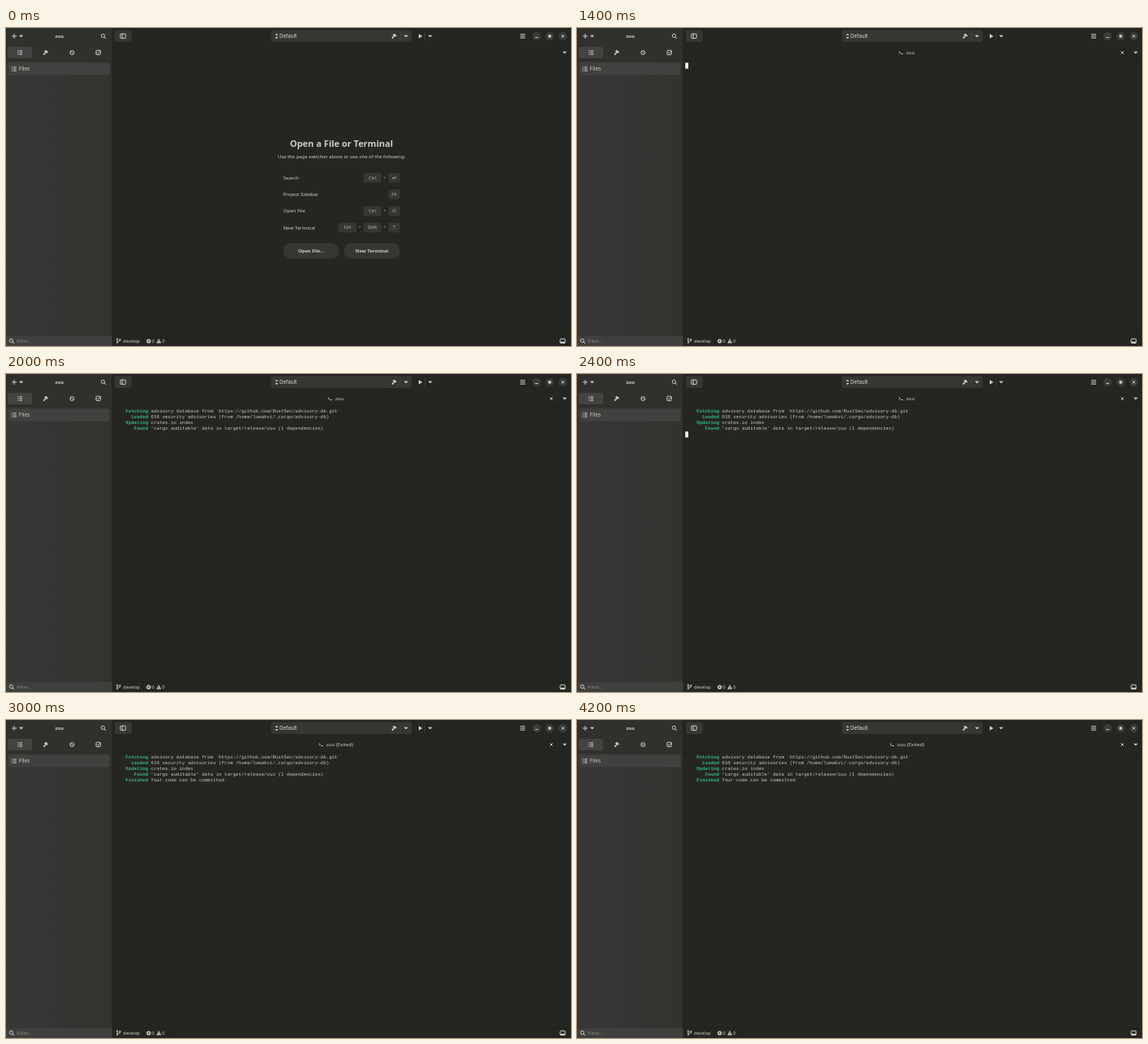
Recreate the animation shown at these times as an HTML page. Size 690 px wide and 388 px high, loop 5.1 s.

```html
<!DOCTYPE html>
<html lang="en">
<head>
<meta charset="utf-8">
<style>
html, body { margin: 0; width: 100%; height: 100%; overflow: hidden; background: #252621; }
svg { display: block; width: 690px; height: 388px; font: 6.05px "Noto Sans", "Open Sans", sans-serif; fill: #cdcdc9; }
.bold { font-weight: 700; }
.mid { text-anchor: middle; }
.line { fill: none; stroke: #cdcdc9; stroke-width: 1; }
.key rect { fill: #363732; }
.key text { font-size: 5.4px; fill: #b9b9b4; }
#term { font: 5.75px "Liberation Mono", monospace; fill: #c9c9c4; }
#term text { white-space: pre; }
#term .status { fill: #35b587; font-weight: 700; }
</style>
</head>
<body>
<svg viewBox="0 0 690 388">
  <defs>
    <linearGradient id="side"><stop offset="0" stop-color="#373836"/><stop offset="1" stop-color="#32332f"/></linearGradient>
    <path id="down" d="M-2.6-1.2h5.2L0 1.5z"/>
    <g id="list">
      <path class="line" d="M-.8-2.2h3.8M-.8 0h3.8M-.8 2.2h3.8"/>
      <path class="line" d="M-3-2.2h1.2M-3 0h1.2M-3 2.2h1.2"/>
    </g>
    <g id="lens" class="line"><circle cx="-.6" cy="-.6" r="2.1"/><path d="M1 1l2 2"/></g>
    <g id="hammer"><path d="M-2.4-1.2L.4-3.2 3.2-.4 2.2.6 1 .1-2 3.2-3.2 2.1-.2-1z"/></g>
    <path id="cross" class="line" d="M-1.6-1.6l3.2 3.2M1.6-1.6l-3.2 3.2"/>
  </defs>

  <!-- sidebar -->
  <rect width="129.5" height="388" fill="url(#side)"/>
  <rect width="129.5" height="40" fill="#30312d"/>
  <path d="M0 40h129.5" stroke="#292a26" stroke-width=".8"/>
  <path d="M129.7 0v388" stroke="#1f201c" stroke-width=".7"/>
  <rect x="2" y="23" width="30" height="14" rx="3" fill="#434441"/>
  <rect x="3" y="42.5" width="123.5" height="15" rx="3" fill="#41423f"/>
  <rect y="376" width="129.5" height="12" fill="#3f403d"/>
  <path class="line" d="M7 10h6M10 7v6"/>
  <use href="#down" x="18.5" y="10"/>
  <text class="bold mid" x="65.2" y="12" font-size="5.9">zuu</text>
  <use href="#lens" x="119" y="10"/>
  <use href="#list" x="17" y="30"/>
  <use href="#hammer" x="48.5" y="30"/>
  <g class="line"><circle cx="80.7" cy="30" r="2.5"/><path d="M79 28.3l3.4 3.4"/>
    <rect x="110" y="27.2" width="5.4" height="5.4" rx="1"/><path d="M111.2 29.8l1.3 1.3 3-3.4"/></g>
  <use href="#list" x="9.7" y="50"/>
  <text x="15.8" y="52.3" font-size="6.45">Files</text>
  <use href="#lens" x="7" y="382"/>
  <text x="13" y="384" font-size="5.9" fill="#8b8c88">Filter…</text>

  <!-- header bar -->
  <path d="M130 39.7h560M130 375.7h560" stroke="#1e1f1b" stroke-width=".8"/>
  <rect x="133" y="2.5" width="20.5" height="14.5" rx="3" fill="#363732"/>
  <g class="line"><rect x="139.7" y="7.2" width="6.4" height="5.4" rx=".8"/><path d="M142 7v6"/></g>
  <rect x="323.5" y="2.5" width="172" height="14.5" rx="3" fill="#363732"/>
  <path d="M328.6 9l1.9-2.3 1.9 2.3zM328.6 11l1.9 2.3 1.9-2.3z"/>
  <text x="334" y="12.2" font-size="6.2" fill="#dededa">Default</text>
  <use href="#hammer" x="474" y="10"/>
  <path d="M481.5 5v10M511.5 5v10" stroke="#4a4b46" stroke-width=".6"/>
  <use href="#down" x="488.5" y="10"/>
  <path d="M504 7.2l4.6 2.8-4.6 2.8z"/>
  <use href="#down" x="518" y="10"/>
  <path class="line" d="M628 7.8h6M628 10h6M628 12.2h6"/>
  <g fill="#3a3b37"><circle cx="648" cy="10" r="5.2"/><circle cx="664" cy="10" r="5.2"/><circle cx="680" cy="10" r="5.2"/></g>
  <path class="line" d="M646.2 11.6h3.6"/>
  <rect x="662.3" y="8.3" width="3.4" height="3.4" rx=".6"/>
  <use href="#cross" x="680" y="10"/>
  <use href="#down" x="682.3" y="30"/>

  <!-- status bar -->
  <g class="line" stroke-width=".8"><circle cx="135.8" cy="379.7" r=".8"/><circle cx="139.2" cy="380.3" r=".8"/><path d="M135.8 380.5v4.5M139.2 381c0 2-3.4 1-3.4 3"/></g>
  <text x="143" y="384" font-size="5.5">develop</text>
  <path d="M167.5 376v12M198 376v12" stroke="#1e1f1b" stroke-width=".8"/>
  <circle cx="174.2" cy="382" r="2.6"/>
  <path d="M173.2 381l2 2M175.2 381l-2 2" stroke="#252621" stroke-width=".8"/>
  <text x="178" y="384" font-size="5.6">0</text>
  <path d="M183.7 384.5l2.9-5.4 2.9 5.4z"/>
  <path d="M186.6 381v1.7M186.6 383.2v.7" stroke="#252621" stroke-width=".7"/>
  <text x="190.6" y="384" font-size="5.6">0</text>
  <rect class="line" x="676.8" y="379.3" width="6" height="5.2" rx=".8"/>
  <path d="M677 382.7h5.6v1.7H677z"/>

  <!-- empty page -->
  <g id="empty">
    <text class="bold mid" x="409.7" y="145" font-size="10.9">Open a File or Terminal</text>
    <text class="mid" x="409.8" y="159" font-size="5.85">Use the page switcher above or use one of the following:</text>
    <g id="keys"></g>
    <g fill="#363732"><rect x="338.5" y="262.5" width="68.5" height="19" rx="9.5"/><rect x="412.7" y="262.5" width="68.5" height="19" rx="9.5"/></g>
    <text class="bold mid" x="372.7" y="274" font-size="5.8">Open File…</text>
    <text class="bold mid" x="446.8" y="274" font-size="5.8">New Terminal</text>
  </g>

  <!-- terminal page -->
  <g id="page">
    <g id="tab">
      <path class="line" stroke-width=".8" d="M0 28.6l1.5 1.2L0 31M2.3 31.5h2.4"/>
      <text id="title" x="8.6" y="32"></text>
    </g>
    <use id="close" href="#cross" y="30"/>
    <g id="term"></g>
    <rect id="cursor" x="132.2" width="3.7" height="7.2" fill="#f2f2ee"/>
  </g>
</svg>
<script>
const $ = id => document.getElementById(id);
const show = (el, on) => el.style.display = on ? "" : "none";

const shortcuts = [["Search", "Ctrl", "↵"], ["Project Sidebar", "F9"], ["Open File", "Ctrl", "O"], ["New Terminal", "Ctrl", "Shift", "T"]];
$("keys").innerHTML = shortcuts.map(([label, ...keys], row) => {
  const y = 182.8 + row * 20.2;
  let right = 481, out = `<text x="338.5" y="${y + 2.2}">${label}</text>`;
  keys.reverse().forEach((key, i) => {
    const w = i ? 22 : 14, mid = right - w / 2;
    const face = key === "↵"
      ? `<path class="line" style="stroke-width:.7" d="M${mid + 1.8} ${y - 1.5}v1.8h-3.6m1.3-1.3l-1.3 1.3 1.3 1.3"/>`
      : `<text class="mid" x="${mid}" y="${y + 1.9}">${key}</text>`;
    out += `<g class="key"><rect x="${right - w}" y="${y - 6}" width="${w}" height="12" rx="2.5"/>${face}</g>`;
    if (i < keys.length - 1) out += `<text class="mid" x="${right - w - 4.5}" y="${y + 1.9}" font-size="5.4" fill="#a0a09b">+</text>`;
    right -= w + 8.5;
  });
  return out;
}).join("");

const rowHeight = 6.95;
const output = [
  [1500, "Fetching", "advisory database from `https://github.com/RustSec/advisory-db.git`"],
  [2000, "Loaded", "616 security advisories (from /home/lumakvi/.cargo/advisory-db)"],
  [2000, "Updating", "crates.io index"],
  [2000, "Found", "'cargo auditable' data in target/release/zuu (1 dependencies)"],
  [2900, "Finished", "Your code can be committed"]
];
$("term").innerHTML = output.map(([, status, rest], i) =>
  `<text x="132.2" y="${46.8 + i * rowHeight}"><tspan class="status">${status.padStart(12)}</tspan> ${rest}</text>`).join("");
const rows = [...$("term").children];

function draw(now) {
  const t = Math.floor(now % 5100 / 100) * 100;  // the screen refreshes every 100 ms
  const open = t >= 1200, exited = t >= 2900;
  show($("empty"), !open);
  show($("page"), open);

  // the new tab widens with an ease-out, its title stays centred
  const p = Math.max(0, Math.min(1, (t - 1138) / 200));
  const width = 546 * (1 - (1 - p) ** 3);
  $("tab").setAttribute("transform", `translate(${130 + width / 2 - (exited ? 20.6 : 9.6)} 0)`);
  $("title").textContent = exited ? "zuu (Exited)" : "zuu";
  $("close").setAttribute("x", 120 + width);
  show($("close"), t >= 1300);

  let count = 0;
  output.forEach(([at], i) => {
    show(rows[i], t >= at);
    if (t >= at) count++;
  });
  $("cursor").setAttribute("y", 42.4 + count * rowHeight);
  show($("cursor"), Math.floor(t / 600) % 2 === 0);
}

let start;
function tick(now) {
  start ??= now;
  draw(now - start);
  requestAnimationFrame(tick);
}
draw(0);
requestAnimationFrame(tick);
</script>
</body>
</html>
```
